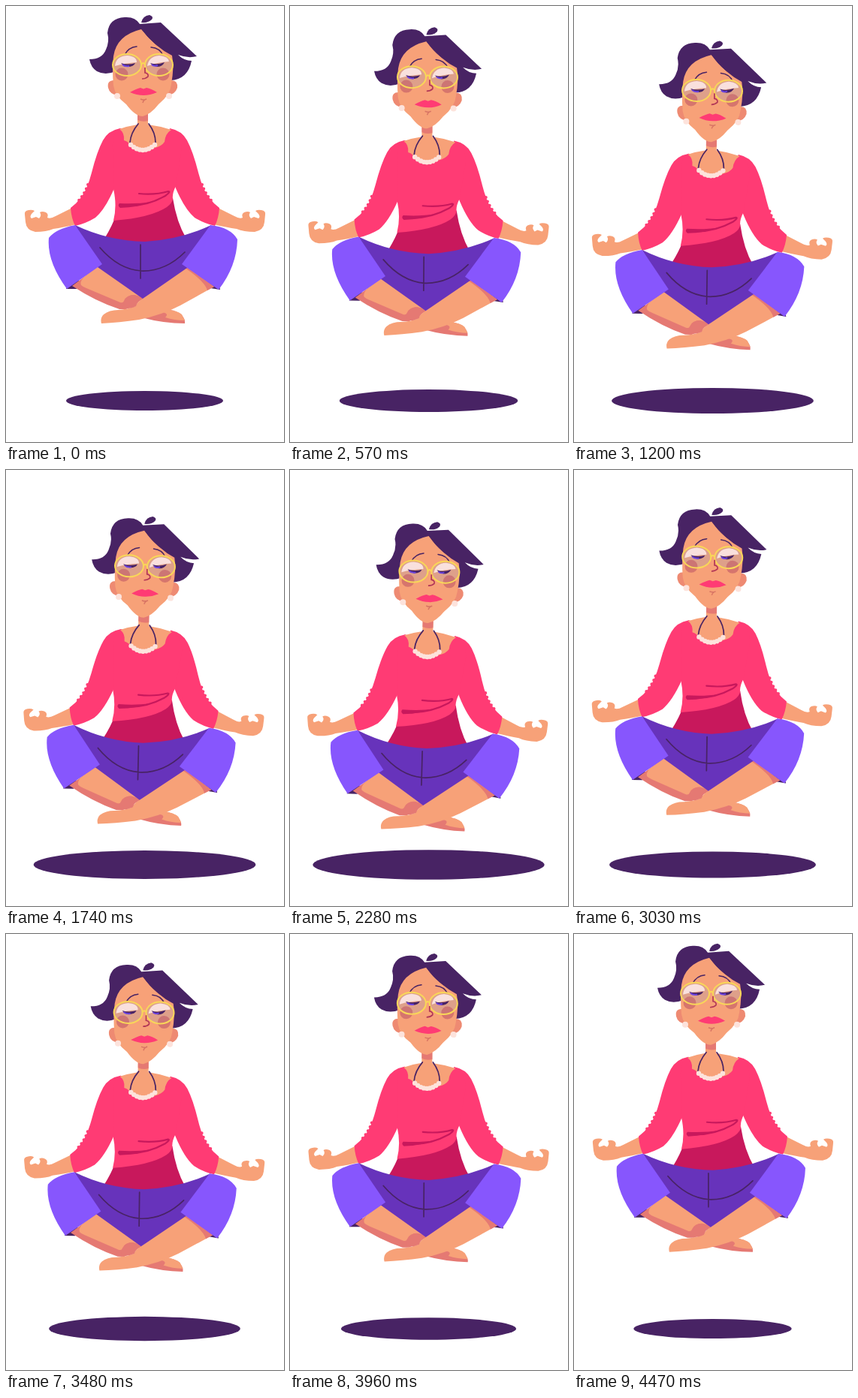
These frames come from a looping animation (370 by 581 pixels, 4500 ms). An HTML page:

```html
<!DOCTYPE html>
<html lang="en">
<head>
<meta charset="utf-8">
<title>Floating meditation</title>
<style>
  html, body { margin: 0; width: 100%; height: 100%; overflow: hidden; background: #fff; }
  svg { display: block; width: 370px; height: 581px; }
  .skin { fill: #f7a178; }
  .shade { fill: #e57973; }
  .ear { fill: #ee8a72; }
  .dark { fill: #482364; }
  .pink { fill: #ff3b74; }
  .berry { fill: #c8185c; }
  .violet { fill: #8756fd; }
  .indigo { fill: #6733bb; }
  .pearl { fill: #fde3dc; }
  .line { fill: none; stroke: #482364; stroke-width: 1.7; stroke-linecap: round; stroke-linejoin: round; }
  .ruffle { fill: none; stroke: #ff3b74; stroke-width: 4; stroke-linecap: round; stroke-dasharray: 0 6; }
</style>
</head>
<body>
<svg viewBox="0 0 370 581">
  <defs>
    <g id="arm">
      <path class="skin" d="M94 291Q76 295 63 297Q54 301 39 301Q27 299 26 288L25 278Q24 273 30 272Q35 271 38 273L34 277Q31 281 34 283L40 281L44 283Q48 279 45 275Q48 273 53 275Q57 277 55 282Q59 284 66 280L88 269Z"/>
      <path class="pink" d="M152 163Q136 166 129 179Q121 194 114 222Q108 245 100 255Q94 263 86 269Q87 283 92 293Q106 290 119 282Q132 271 144 243L160 200Z"/>
      <path class="ruffle" d="M109 238Q105 250 96 260M136 253Q129 270 114 282"/>
    </g>
  </defs>

  <ellipse id="shadow" class="dark" cx="184.5" cy="526"/>

  <g id="body">
    <!-- legs -->
    <path class="dark" d="M80 377L94 377L98 366L84 364ZM285 378L272 376L264 366L282 362Z"/>
    <path class="shade" d="M126 344L88 373Q120 394 151 404L160 404L183 390Z"/>
    <path class="skin" d="M126 344L103 362Q98 368 100 372Q102 374 107 376L152 395Q156 396 157 393Q160 385 171 385L183 390Z"/>
    <path class="shade" d="M180 415L212 404Q229 406 234 412Q239 418 238 423Q210 423 180 415Z"/>
    <path class="skin" d="M212 404Q229 406 234 411L238 419Q224 419 212 415Q218 409 206 408Z"/>
    <path class="skin" d="M236 344L182 390Q175 394 172 400Q163 404 150 405Q137 405 130 411Q125 416 127 423Q150 422 177 418Q207 412 232 399L277 374Z"/>
    <path class="shade" d="M155 403Q157 387 168 385Q177 385 182 390Q175 393 173 400Q165 404 155 403ZM240 346L277 374L268 379Q265 367 238 349Z"/>
    <!-- sweater and arms -->
    <use href="#arm"/>
    <use href="#arm" transform="matrix(-1 0 0 1 370 0)"/>
    <path class="berry" d="M146 279Q142 292 131 310L150 318H225L240 310Q227 288 222 256Z"/>
    <path class="pink" d="M152 163Q141 168 142 190L143 244Q148 266 143 286Q193 282 214 268Q221 263 222 257Q221 250 226 240L234 190Q232 168 219 165L185 172Z"/>
    <path d="M152 266Q184 269 212 253Q220 247 216 247Q199 252 177 250" fill="none" stroke="#c8185c" stroke-width="2.2" stroke-linecap="round"/>
    <path class="berry" d="M151 263Q176 264 192 261Q176 268 152 269Q148 266 151 263Z"/>
    <!-- shorts -->
    <path class="indigo" d="M92 292Q136 313 185 314Q233 311 273 292L241 349L182 390L122 348Z"/>
    <path class="violet" d="M92 292Q66 297 57 309Q54 340 81 377L128 344ZM272 292Q299 295 308 311Q307 347 283 378L234 344Z"/>
    <path class="line" d="M125 322Q150 351 180 353Q212 354 238 328M179 318V363"/>
    <!-- neck -->
    <path class="skin" d="M151 164Q162 160 175 158V143H189V158Q205 160 220 165Q212 170 211 181Q207 187 198 189Q183 197 167 188Q164 181 157 179Q158 169 151 164Z"/>
    <path class="shade" d="M175 144H189V153Q182 155 175 152Z"/>
    <path class="line" d="M176 157Q166 169 165 182M190 157Q199 169 199 182"/>
    <g id="pearls" class="pearl"></g>
    <!-- head -->
    <path class="dark" d="M111 71Q128 71 133 58Q138 47 135 36Q137 16 158 15Q172 14 178 24L206 22L254 67Q242 70 229 65Q237 73 247 73Q242 98 219 99L146 87Q132 93 121 87Q113 82 111 71Z"/>
    <path class="dark" d="M180 22Q182 13 191 12Q197 14 194 18Q189 23 180 22Z"/>
    <path class="ear" d="M144 99Q134 99 136 109Q138 118 149 119ZM220 99Q229 99 228 109Q225 118 215 119Z"/>
    <path class="skin" d="M180 31Q147 39 143 67Q141 84 143 106Q145 120 160 131Q172 147 182 147Q193 144 203 131Q219 118 220 104Q224 82 221 66Q200 56 180 31Z"/>
    <path class="line" d="M181 31Q197 54 219 61" style="stroke-width:1"/>
    <circle class="pearl" cx="148" cy="120" r="4"/>
    <circle class="pearl" cx="217" cy="120" r="4"/>
    <path class="line" d="M158 65Q163 55 174 54M193 55Q205 56 209 66" style="stroke-width:1.5"/>
    <!-- glasses and eyes -->
    <g fill="#dea08a">
      <ellipse cx="161" cy="78.5" rx="19" ry="14.5"/>
      <ellipse cx="203.5" cy="78.5" rx="18.5" ry="14.5"/>
    </g>
    <g fill="#bf5866" fill-opacity=".6">
      <circle cx="154" cy="91" r="8.5"/>
      <circle cx="209" cy="91" r="8.5"/>
    </g>
    <path fill="#f9e0dd" d="M145 80Q146 67 161 66Q174 67 174 75Q158 76 145 80ZM188 80Q190 67 204 66Q216 67 217 74Q201 75 188 80Z"/>
    <path class="dark" d="M153 76Q162 79 172 76Q170 81 162 81Q156 80 153 76ZM192 76Q201 79 211 75Q208 81 201 81Q195 80 192 76Z"/>
    <path d="M155 78Q158 81 164 80M194 78Q197 81 202 79" fill="none" stroke="#6941e0" stroke-width="2"/>
    <g fill="none" stroke="#f9d758" stroke-width="2">
      <ellipse cx="161" cy="78.5" rx="19" ry="14.5"/>
      <ellipse cx="203.5" cy="78.5" rx="18.5" ry="14.5"/>
      <path d="M180 78Q182.5 74 185 78"/>
    </g>
    <path d="M185 82V89Q190 90 189 94Q186 97 181 97" fill="none" stroke="#b23757" stroke-width="1.7"/>
    <path class="pink" d="M165 115Q174 110 179 109L183 110.5L187 109Q193 110 201 115Q192 119 183 119Q174 119 165 115Z"/>
    <path d="M179 124Q183 126 187 124Q183 125 182 129" fill="none" stroke="#d87464" stroke-width="1.5"/>
  </g>
</svg>
<script>
const LOOP = 4500, TURN = 2130, STEP = 30, DROP = 61;
const shadow = document.getElementById('shadow');
const body = document.getElementById('body');

document.getElementById('pearls').innerHTML = Array.from({ length: 9 }, (_, i) => {
  const u = i / 4 - 1;
  return `<circle cx="${182 + 16 * u}" cy="${192 - 7 * u * u}" r="3.2"/>`;
}).join('');

function draw() {
  const t = Math.floor(performance.now() % LOOP / STEP) * STEP;
  const drop = DROP * (t < TURN ? t / TURN : (LOOP - t) / (LOOP - TURN));
  body.setAttribute('transform', `translate(0 ${drop}) rotate(${drop * 0.0263} 185 208)`);
  shadow.setAttribute('rx', 104.5 + 0.87 * drop);
  shadow.setAttribute('ry', 13 + 0.12 * drop);
  requestAnimationFrame(draw);
}
draw();
</script>
</body>
</html>
```
